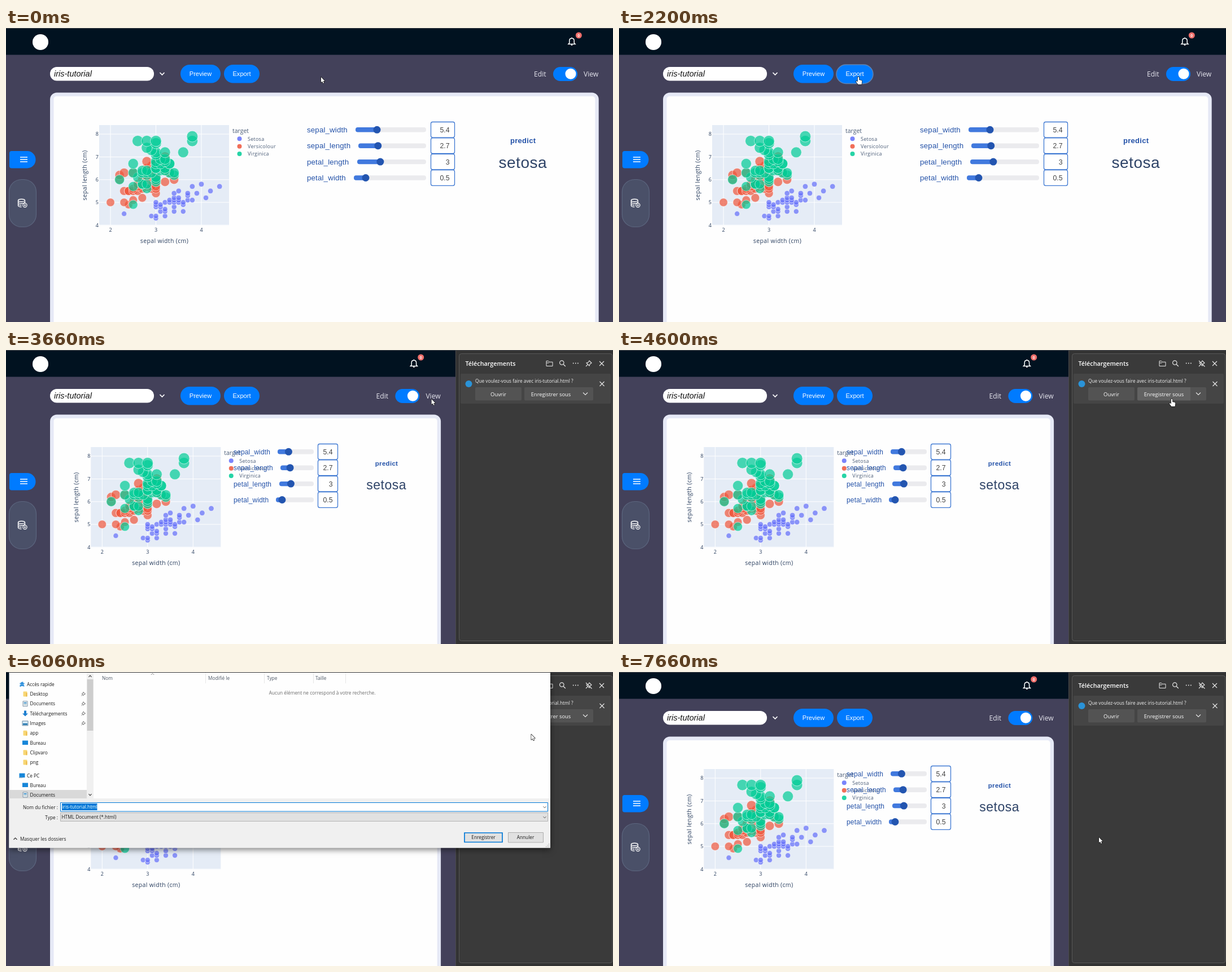
An HTML page with a canvas for the animation above (8 s loop, 1075 by 521 pixels).

```html
<!DOCTYPE html>
<html lang="en">
<head>
<meta charset="utf-8">
<title>Dashboard export</title>
<style>
html, body { margin: 0; width: 100%; height: 100%; overflow: hidden; background: #43415a; }
canvas { display: block; }
</style>
</head>
<body>
<canvas id="stage" width="1075" height="521"></canvas>
<script>
const ctx = document.getElementById('stage').getContext('2d');
const LOOP = 8000, TICK = 1000 / 15;
const OPEN = '"Open Sans", sans-serif', ARIAL = '"Liberation Sans", Arial, sans-serif';
const BLUE = '#007bff', WIN_BLUE = '#0078d7', INK = '#2a3f5f', LABEL = '#2452a8';

// Sepal widths in tenths of a cm, one row per 0.1 cm of sepal length.
const SPECIES = [
  { name: 'Setosa', color: '#636efa', from: 4.3, petal: y => 1.46 + (y - 5) * 0.12, rows: [
    [30], [29, 30, 32], [23], [31, 32, 34, 36], [32], [30, 31, 34], [30, 31, 36],
    [30, 32, 33, 34, 35, 36], [33, 34, 35, 37, 38], [34, 35, 41], [37], [34, 37, 39],
    [35, 42], [], [38, 44], [40]] },
  { name: 'Versicolour', color: '#ef553b', from: 4.9, petal: y => 4.26 + (y - 5.94) * 0.7, rows: [
    [24], [20, 23], [25], [27], [], [30], [23, 24, 24, 25, 26], [25, 27, 29, 30],
    [26, 28, 29, 30], [26, 27], [30, 32], [22, 27, 29, 34], [28, 29, 30], [22, 29],
    [23, 25, 33], [29, 32], [28], [29, 30], [30, 31], [28], [31], [32]] },
  { name: 'Virginica', color: '#00cc96', from: 5.6, petal: y => 5.55 + (y - 6.59) * 0.75, rows: [
    [28], [25], [27, 27, 28], [30], [22, 30], [26, 30], [28, 34], [25, 27, 28, 29, 33, 34],
    [27, 28, 31, 32], [30, 30, 32], [], [25, 30, 31, 33, 33], [30, 32], [31, 32], [], [30],
    [30, 32, 36], [29], [28], [], [30], [26, 28, 30, 38], [], [38]] },
];
SPECIES[2].extra = [[25, 4.9]];

const SLIDERS = [
  ['sepal_width', 86, 0.304, '5.4'], ['sepal_length', 91, 0.29, '2.7'],
  ['petal_length', 89, 0.335, '3'], ['petal_width', 83, 0.164, '0.5'],
];

// Pointer stops: time, x, y, and whether the move to it is linear.
const PATH = [
  [0, 558, 87], [470, 558, 87], [660, 549, 89], [800, 549, 89], [1530, 424, 87],
  [3070, 424, 87], [4130, 979, 87], [5730, 979, 87], [6060, 931, 108, true],
  [6600, 868, 306, true], [6660, 868, 306], [6730, 868, 315], [7130, 850, 293], [LOOP, 850, 293],
];
const ARROW = new Path2D('M0 0V9.6L2.2 7.6 3.7 10.9 5.2 10.2 3.7 7H6.7Z');
const HAND = new Path2D('M-1.2 1Q-1.2-.5 0-.5T1.2 1V5L5 5.8Q6.5 6.3 6.3 8L5.5 13H-.5L-4 8.5Q-4.5 7-3 7L-1.2 8.5Z');

function box(x0, y0, x1, y1, fill, r = 0, stroke, lw = 1) {
  ctx.beginPath();
  ctx.roundRect(x0, y0, x1 - x0, y1 - y0, r);
  if (fill) { ctx.fillStyle = fill; ctx.fill(); }
  if (stroke) { ctx.strokeStyle = stroke; ctx.lineWidth = lw; ctx.stroke(); }
}

function dot(x, y, r, fill, stroke, lw = 1) {
  ctx.beginPath();
  ctx.arc(x, y, r, 0, 7);
  if (fill) { ctx.fillStyle = fill; ctx.fill(); }
  if (stroke) { ctx.strokeStyle = stroke; ctx.lineWidth = lw; ctx.stroke(); }
}

function text(s, x, y, font, color, align = 'left', spacing = 0) {
  ctx.font = font;
  ctx.fillStyle = color;
  ctx.textAlign = align;
  ctx.letterSpacing = spacing + 'px';
  ctx.fillText(s, x, y);
}

// Strokes SVG path data around an origin.
function icon(x, y, d, color, lw = 1) {
  ctx.save();
  ctx.translate(x, y);
  ctx.strokeStyle = color;
  ctx.lineWidth = lw;
  ctx.stroke(new Path2D(d));
  ctx.restore();
}

function pointer(t) {
  const i = PATH.findIndex(p => p[0] > t);
  const [t0, x0, y0] = PATH[i - 1], [t1, x1, y1, linear] = PATH[i];
  const u = (t - t0) / (t1 - t0), k = linear ? u : u * u * (3 - 2 * u);
  return { x: x0 + (x1 - x0) * k, y: y0 + (y1 - y0) * k };
}

const inside = (p, x0, y0, x1, y1) => p.x >= x0 && p.x <= x1 && p.y >= y0 && p.y <= y1;

function drawChart(dx) {
  ctx.save();
  ctx.translate(dx, 0);
  const px = w => 185 + (w - 2) * 80.5, py = l => 349.3 - (l - 4) * 40.3;
  const small = '9px ' + OPEN, axis = '10.5px ' + OPEN;
  box(165, 172, 395, 350, '#e5ecf6');
  for (const w of [2, 3, 4]) {
    box(px(w) - 0.5, 172, px(w) + 0.5, 350, '#fff');
    text(w, px(w), 360.5, small, INK, 'center');
  }
  for (const l of [4, 5, 6, 7, 8]) {
    box(165, py(l) - 0.5, 395, py(l) + 0.5, '#fff');
    text(l, 164, py(l) + 3.3, small, INK, 'right');
  }
  ctx.globalAlpha = 0.7;
  for (const s of SPECIES) {
    const mark = (w, l) => dot(px(w / 10), py(l), 10 * Math.sqrt(s.petal(l) / 6.7), s.color, '#fff', 0.8);
    (s.extra || []).forEach(([w, l]) => mark(w, l));
    s.rows.forEach((row, i) => row.forEach(w => mark(w, s.from + i / 10)));
  }
  ctx.globalAlpha = 1;
  text('sepal width (cm)', 280.5, 380.5, axis, INK, 'center', 0.35);
  ctx.save();
  ctx.translate(142.5, 261);
  ctx.rotate(-Math.PI / 2);
  text('sepal length (cm)', 0, 0, axis, INK, 'center', 0.35);
  ctx.restore();
  ctx.globalAlpha = 0.85;
  text('target', 401, 185.5, axis, INK);
  SPECIES.forEach((s, i) => {
    dot(413.5, 196.3 + i * 13.4, 4, s.color);
    text(s.name, 428, 199.6 + i * 13.4, small, INK, 'left', 0.25);
  });
  ctx.restore();
}

function drawSliders(narrow) {
  const x = narrow ? 403 : 533, end = narrow ? 545 : 744, cut = narrow ? 8 : 0;
  const [b0, b1] = narrow ? [552.5, 587.5] : [752.5, 794.5];
  SLIDERS.forEach(([name, offset, part, value], i) => {
    const y = 180.3 + i * 28.4, start = x + offset - cut, knob = start + (end - start) * part;
    text(name, x, y + 4.5, (narrow ? 12 : 13.3) + 'px ' + ARIAL, LABEL, 'left', 0.15);
    box(start, y - 4.2, end, y + 4.2, '#ebebee', 4);
    box(start, y - 4.2, knob, y + 4.2, '#4179de', 4);
    dot(knob, y, 6.5, '#2355b0');
    box(b0, y - 13.8, b1, y + 13.8, '#fff', 3, '#3e78d2', 1.3);
    text(value, b1 - 9, y + 4.5, '12.3px ' + ARIAL, '#444', 'right');
  });
}

function button(label, x0, x1, hot) {
  const g = hot ? 1 : 0;
  box(x0 - g, 65, x1 + g, 97.5 + g, BLUE, 17, hot && '#5f84b5', 1.5);
  text(label, (x0 + x1) / 2, 85, '11.1px ' + ARIAL, '#fff', 'center');
}

function drawPage(narrow, p) {
  const s = narrow ? 279.6 : 0;
  box(0, 0, 1075, 521, '#43415a');
  box(0, 0, 1075, 47.5, '#011220');
  box(0, 0, 1075, 1, '#4a4d52');
  dot(61, 25, 14, '#fff');

  icon(1002 - s, 24, 'M-6 4.5H6L4.2 2.5V-1.5C4.2-4.5 2.5-5.8 0-5.8S-4.2-4.5-4.2-1.5V2.5ZM0-7.2V-5.5M-1.3 6.3H1.3', '#fff', 1.5);
  dot(1014.3 - s, 13, 5.5, '#f0706c');
  text('0', 1014.3 - s, 15.5, 'bold 7px ' + ARIAL, '#fff', 'center');

  box(78, 69, 262, 93.5, '#fff', 12);
  text('iris-tutorial', 85, 86, 'italic 14.5px ' + ARIAL, '#111');
  icon(276.5, 81, 'M-4-2L0 2 4-2', '#fff', 1.7);
  button('Preview', 309, 380);
  button('Export', 386, 449, inside(p, 386, 65, 449, 97));
  text('Edit', 935 - s, 86, '12.2px ' + OPEN, '#e6e6ee');
  text('View', 1023 - s, 86, '12.1px ' + OPEN, '#e6e6ee');
  box(969 - s, 69, 1012 - s, 94, BLUE, 12.5);
  dot(1000 - s, 81.3, 9.5, '#fff');

  box(78, 114.5, 1049.7 - s, 540, '#e6e9f6', 12);
  box(84.5, 121, 1043.3 - s, 540, '#fefefe', 5);

  box(6, 218, 52.5, 248.5, BLUE, [4, 15, 15, 4]);
  icon(31.5, 233, 'M-6.5-4H6.5M-6.5 0H6.5M-6.5 4H6.5', '#fff', 1.6);
  box(5.5, 268.5, 53.5, 352.5, '#4a5068', 22, '#5c667f', 1.2);
  icon(27.5, 310, 'M-6-4.5C-6-7.5 6-7.5 6-4.5S-6-1.5-6-4.5V4.5C-6 6-3 7 0 7M6-4.5V0M-6-1.5C-6 0-3 1 0 1S4 .7 6-1M-6 1.5C-6 3-3 4 0 4', '#fff', 1.3);
  dot(33.5, 314, 3.6, '#4a5068', '#fff', 1.2);
  icon(33.5, 314, 'M-2 0H2M0-2V2', '#fff', 1);

  drawChart(narrow ? -14.7 : 0);
  drawSliders(narrow);
  text('predict', narrow ? 674 : 915.7, narrow ? 205 : 204, `bold ${narrow ? 11.5 : 13}px ` + ARIAL, LABEL, 'center', 0.3);
  text('setosa', narrow ? 673.7 : 915.3, narrow ? 246.5 : 248, `${narrow ? 23 : 28}px ` + ARIAL, '#2f4468', 'center', 0.5);
}

function drawSkeleton() {
  const bone = (x, y, w, h) => box(x, y, x + w, y + h, '#4b4b4b', 1);
  ctx.save();
  ctx.beginPath();
  ctx.rect(803, 7, 270, 508);
  ctx.clip();
  bone(814, 17, 72, 13);
  for (let i = 0; i < 4; i++) bone(980 + i * 22.7, 17, 13, 13);
  for (let i = 0; i < 14; i++) {
    const y = 49.5 + i * 35.3;
    bone(814, y + 5.5, 12, 12);
    bone(831, y, 144.5, 10);
    bone(831, y + 12.5, 37, 10);
  }
  ctx.restore();
}

function drawDownloads(t, p) {
  const ui = '9.4px ' + OPEN, gray = '#e8e8e8', cross = 'M-4-4L4 4M4-4L-4 4';
  const fill = hot => hot ? '#626262' : '#535353';
  const live = t < 5730;
  text('Téléchargements', 813.5, 28.3, '600 10.8px ' + OPEN, '#fff');
  icon(962.5, 24, 'M-5.5-4.5H-2L0-2.7H5.5V4.5H-5.5ZM-5.5-1.2H-1.5L0-2.7', gray);
  icon(985, 23, 'M3-.5A3.7 3.7 0 1 1-4.4-.5 3.7 3.7 0 0 1 3-.5M2 2.3L5.8 6', gray, 1.2);
  for (const x of [1004.7, 1008.8, 1012.9]) dot(x, 23.5, 0.9, gray);
  icon(1032, 24, 'M1-5L5-1 2 1 1 4-4-1-1-2ZM-1.7 1.7L-5 5' + (t >= 4460 ? 'M-5-5L5.5 5.5' : ''), gray, 1.1);
  icon(1055, 24, cross, gray, 1.1);

  box(805, 42, 1071, 95, '#454545', 2);
  dot(819.5, 60, 6, '#2a93d8');
  text('Que voulez-vous faire avec iris-tutorial.html ?', 831, 58.3, '8.3px ' + OPEN, '#f2f2f2');
  icon(1055.5, 60, cross, gray, 1.1);
  box(831, 66, 913, 89.5, fill(live && inside(p, 831, 66, 913, 90)), 2);
  box(918, 66, 1012, 89.5, fill(live && inside(p, 918, 66, 1012, 90)), [2, 0, 0, 2]);
  box(1012, 66, 1040, 89.5, fill(false), [0, 2, 2, 0]);
  text('Ouvrir', 872, 81.6, ui, '#fff', 'center');
  text('Enregistrer sous', 965, 81.6, ui, '#fff', 'center');
  icon(1026, 77.5, 'M-4-2L0 2 4-2', gray, 1.1);
}

function drawPanel(t, p) {
  box(796, 0, 1075, 521, '#333');
  box(796, 0, 1075, 1, '#4a4d52');
  box(796, 1, 797, 521, '#4a4a4a');
  if (t < 2600) return;
  box(802.5, 6.5, 1074, 515.5, '#3a3a3a', 4, '#585858');
  if (t >= 3130) drawDownloads(t, p);
  else if (t >= 2660) drawSkeleton();
}

const UI = '8.3px ' + OPEN;

function placeIcon(kind, x, y) {
  if (kind === 'folder') {
    box(x - 3.5, y - 4.5, x + 3.5, y + 4.5, '#f8d775', 1);
    box(x + 1.5, y - 2, x + 3.5, y + 4.5, '#e9b84a');
  } else if (kind === 'file') {
    box(x - 4, y - 4.5, x + 4, y + 4.5, '#eef3f7', 0, '#7f93a5');
    box(x - 2.5, y - 2.5, x + 2.5, y - 0.5, '#3b8fc7');
    box(x - 2.5, y + 1, x + 2.5, y + 2, '#8aa');
  } else if (kind === 'down') {
    ctx.fillStyle = '#1e7fd0';
    ctx.beginPath();
    [[-2, -5], [2, -5], [2, 0], [5, 0], [0, 5], [-5, 0], [-2, 0]].forEach(([a, b]) => ctx.lineTo(x + a, y + b));
    ctx.fill();
  } else if (kind === 'image') {
    box(x - 5, y - 4, x + 5, y + 4, '#d8ecf8', 0, '#6d8ba3');
    box(x - 4, y, x + 4, y + 3, '#2f7fb5');
  } else if (kind === 'star') {
    icon(x, y, 'M-4-1.5H4M-3.5 4L1.5-4.5M-1.5-4L3.5 3.5M-4 2H3', '#2c8fdc', 1.8);
  } else {
    box(x - 5, y - 4, x + 5, y + 3.5, '#1686d9');
    if (kind === 'pc') box(x - 5.5, y + 3, x + 1, y + 4.5, '#9db5c7');
  }
}

function place(label, kind, y, indent = 0) {
  if (kind) placeIcon(kind, indent ? 34 : 28.5, y);
  text(label, 37 + indent, y + 3, UI, '#1a1a1a');
}

function drawSidebar() {
  box(5, 209, 143, 224, '#d9d9d9');
  place('Accès rapide', 'star', 22);
  [['Desktop', 'folder'], ['Documents', 'file'], ['Téléchargements', 'down'], ['Images', 'image'],
    ['app', 'folder'], ['Bureau', 'desk'], ['Clipvaro', 'folder'], ['png', 'folder']]
    .forEach(([label, kind], i) => {
      const y = 39 + i * 17.3;
      place(label, kind, y, 5.5);
      if (i < 4) icon(137, y, 'M0-3.5L3.5 0 1 .8 .2 2.7-2.7-.2-.8-1ZM-1.2 1.2L-3.3 3.3', '#666');
    });
  place('Ce PC', 'pc', 183.5);
  place('Bureau', 'desk', 200.5, 5.5);
  place('Documents', 'file', 217.5, 5.5);
  box(143, 1, 155, 224, '#f0f0f0');
  box(143.5, 13, 154.5, 104, '#cdcdcd');
  icon(149, 7.5, 'M-2.5 1.3L0-1.3 2.5 1.3', '#444', 1.2);
  icon(149, 217.5, 'M-2.5-1.3L0 1.3 2.5-1.3', '#444', 1.2);
}

function drawForm(t, p) {
  const down = 'M-2.5-1.3L0 1.3 2.5-1.3';
  text('Nom du fichier :', 92, 242.5, UI, '#1a1a1a', 'right');
  box(96.5, 231.5, 959.5, 247, '#fff', 0, WIN_BLUE);
  box(99, 233, 161.5, 245, WIN_BLUE);
  text('iris-tutorial.html', 99.5, 242, UI, '#fff');
  if (t >= 6660 && t < 7130) box(161.5, 233, 162.5, 245, '#000');
  icon(954, 239.5, down, '#555');
  text('Type :', 92, 260.5, UI, '#1a1a1a', 'right');
  box(96.5, 249.5, 959.5, 264.5, '#e1e1e1', 0, '#b5b5b5');
  text('HTML Document (*.html)', 98.5, 260.3, UI, '#1a1a1a');
  icon(954, 257.5, down, '#555');
  icon(16.5, 295.5, 'M-3 1.5L0-1.5 3 1.5', '#333', 1.2);
  text('Masquer les dossiers', 25, 298.5, UI, '#1a1a1a');
  box(812, 285, 879, 301.5, inside(p, 811, 284, 880, 302) ? '#e5f1fb' : '#e1e1e1', 0, WIN_BLUE, 1.7);
  text('Enregistrer', 845.5, 296.3, UI, '#1a1a1a', 'center');
  box(889.5, 284.5, 951.5, 302, '#e1e1e1', 0, '#adadad');
  text('Annuler', 920, 296.3, UI, '#1a1a1a', 'center');
  for (let i = 0; i < 3; i++)
    for (let j = 0; j <= i; j++) box(961 - j * 2.5, 304 + i * 2.5, 962.2 - j * 2.5, 305.2 + i * 2.5, '#aaa');
}

function drawDialog(t, p) {
  ctx.save();
  if (t >= 7460) {
    const k = t >= 7530 ? 0.3 : 0.7;
    ctx.globalAlpha = k;
    ctx.translate(484.5, 156);
    ctx.scale(0.96 + k * 0.04, 0.96 + k * 0.04);
    ctx.translate(-484.5, -156);
  }
  ctx.save();
  ctx.shadowColor = 'rgba(0,0,0,.5)';
  ctx.shadowBlur = 10;
  ctx.shadowOffsetY = 3;
  box(5.5, 0, 964, 311.5, '#fefefe');
  ctx.restore();
  box(5.5, 0, 964, 1, '#333');

  [['Nom', 170], ['Modifié le', 358], ['Type', 462], ['Taille', 548]]
    .forEach(([label, x]) => text(label, x, 14, UI, '#4c5664'));
  for (const x of [353, 457, 544, 601]) box(x, 1, x + 1, 20, '#e6e6e6');
  icon(259.5, 3.5, 'M-2.5 1.3L0-1.3 2.5 1.3', '#777');
  text('Aucun élément ne correspond à votre recherche.', 560, 40, UI, '#6a6a6a', 'center');

  if (t >= 5800) drawSidebar();
  else {
    box(5.5, 36, 155, 53, '#d9d9d9');
    place('Accès rapide', 'star', 22);
    place('Ce PC', 'pc', 45);
    place('Réseau', '', 68);
  }
  const painted = t >= 5660;
  box(5.5, painted ? 224 : 270, 964, 311.5, '#f0f0f0');
  if (painted) drawForm(t, p);
  else {
    box(11, 287, 113, 303, '#fefefe');
    box(811, 284, 880, 303, '#fefefe');
    box(889, 284, 952, 303, '#fefefe');
    box(952, 299, 964, 311.5, '#fefefe');
  }
  ctx.restore();
}

function drawPointer(t, p) {
  const link = t < 5730 && (inside(p, 386, 65, 449, 97) || inside(p, 831, 66, 913, 90) || inside(p, 918, 66, 1012, 90));
  const shape = link ? HAND : ARROW;
  ctx.save();
  ctx.translate(p.x, p.y);
  ctx.strokeStyle = '#111';
  ctx.lineWidth = 1.3;
  ctx.lineJoin = 'round';
  ctx.stroke(shape);
  ctx.fillStyle = '#fff';
  ctx.fill(shape);
  ctx.restore();
}

function render(now) {
  const t = Math.floor((now % LOOP + 7) / TICK) * TICK % LOOP;
  const p = pointer(t);
  drawPage(t >= 2790, p);
  if (t >= 2530) drawPanel(t, p);
  if (t >= 2000 && t < 2200) {
    box(429.5, 95.5, 528.5, 114.5, '#fff', 0, '#767676');
    text('Export current project', 479, 108, UI, '#575757', 'center');
  }
  if (t >= 5600 && t < 7660) drawDialog(t, p);
  drawPointer(t, p);
}

const begin = performance.now();
function frame() {
  render(performance.now() - begin);
  requestAnimationFrame(frame);
}
frame();
</script>
</body>
</html>
```
